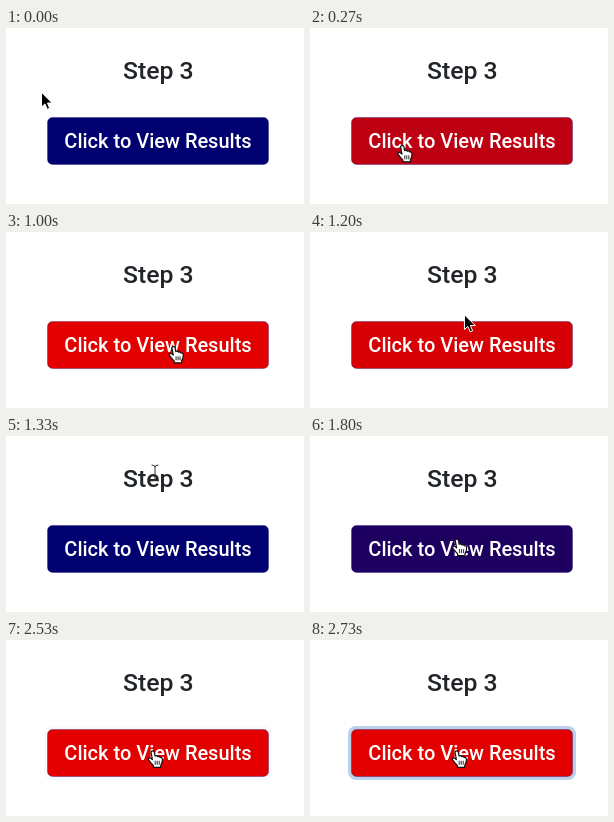
An HTML page that plays this animation: 298x176 px, repeating every 2940 ms.

```html
<!DOCTYPE html>
<html lang="en">
<head>
<meta charset="utf-8">
<title>Step 3</title>
<style>
  html, body { margin: 0; height: 100%; overflow: hidden; background: #fff; }
  svg { display: block; width: 100vw; height: 100vh; }
  text { font: 500 20px Roboto, sans-serif; text-anchor: middle; }
</style>
</head>
<body>
<svg viewBox="0 0 298 176">
  <text x="152.3" y="51" fill="#212529" style="font-size:24.8px">Step 3</text>
  <rect id="ring" x="38" y="86" width="228" height="54" rx="8" fill="#bccfeb"/>
  <rect id="button" x="41.5" y="89.5" width="221" height="47" rx="5" stroke="#000070" stroke-opacity=".3"/>
  <text x="152" y="120" fill="#fff">Click to View Results</text>
  <g id="cursor" stroke-linejoin="round" stroke-linecap="round">
    <path id="arrow" d="M0 0V14.5L3.4 11.4L5.8 16.8L8.2 15.8L5.9 10.5H10.4Z"
      fill="#000" stroke="#fff"/>
    <g id="hand" stroke="#111" stroke-width="1.2" fill="#fff">
      <path d="M-2 1Q-.3-1.4 1.3 1L2 5Q3.8 4 4.7 5.6Q6.2 4.8 7.2 6.5Q9.4 6 9.4 8.8Q9.4 12 7.8 14V16.3H.4V14.6Q-2.6 11.5-4.6 8.6Q-4.6 6-2.2 7.2L-.6 8.6Z"/>
      <path d="M2.2 10.2V13.4M4.2 10.2V13.4M6.2 10.2V13.4" stroke-width=".9"/>
    </g>
    <g id="beam" fill="none" stroke="#333">
      <path d="M-3-8Q0-8 0-6Q0-8 3-8M0-6V6M-3 8Q0 8 0 6Q0 8 3 8M-1.5 3H1.5"/>
    </g>
  </g>
</svg>
<script>
const LOOP = 2940, STEP = 1000 / 15, FADE = 150;
const NAVY = [0, 0, 112], RED = [226, 0, 0];
const ENTER = 155, LEAVE = 1180, RETURN = 1766, FOCUS = 2500;
const $ = id => document.getElementById(id);

// Resting points of the pointer: time, x, y
const stops = [
  [0, 35.5, 64.5], [370, 106, 130], [530, 116, 126], [800, 196, 119],
  [1100, 158, 113], [1333, 149, 37], [1600, 149, 37], [1850, 147, 111]
];

// Smooth 0 to 1 transition beginning at the given time
function ease(time, start, duration = FADE) {
  const k = Math.min(1, Math.max(0, (time - start) / duration));
  return k * k * (3 - 2 * k);
}

function pointer(time) {
  let [, x, y] = stops[0];
  for (let i = 1; i < stops.length; i++) {
    const [t0, x0, y0] = stops[i - 1], [t1, x1, y1] = stops[i];
    const k = ease(time, t0, t1 - t0);
    x += (x1 - x0) * k;
    y += (y1 - y0) * k;
  }
  return [x, y];
}

function draw() {
  const time = Math.floor((performance.now() % LOOP + 3.4) / STEP) * STEP;
  const [x, y] = pointer(time);
  const overButton = x > 41 && x < 263 && y > 89 && y < 137;
  const overTitle = x > 117 && x < 187 && y > 28 && y < 60;
  const kind = overButton ? "hand" : overTitle ? "beam" : "arrow";

  for (const id of ["arrow", "hand", "beam"])
    $(id).style.display = id === kind ? "" : "none";
  $("cursor").setAttribute("transform", `translate(${x} ${y})`);

  const hover = ease(time, ENTER) - ease(time, LEAVE) + ease(time, RETURN);
  const color = NAVY.map((c, i) => Math.round(c + (RED[i] - c) * hover));
  $("button").setAttribute("fill", `rgb(${color})`);
  $("ring").setAttribute("opacity", ease(time, FOCUS));
  requestAnimationFrame(draw);
}
draw();
</script>
</body>
</html>
```
